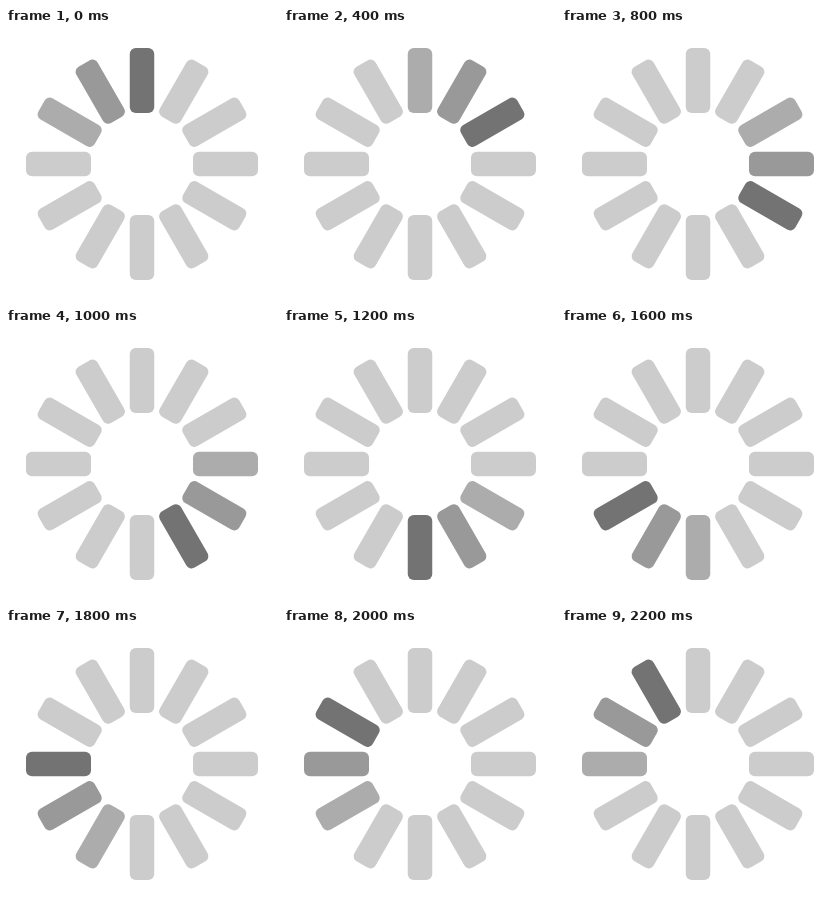
Animation, 272 px wide and 272 px high, one loop 2400 ms. Source, as an HTML page:

```html
<!DOCTYPE html>
<html lang="en">
<head>
<meta charset="utf-8">
<title>Spinner</title>
<style>
  html, body { margin: 0; width: 100%; height: 100%; overflow: hidden; background: #fff; }
  svg { display: block; width: 272px; height: 272px; }
</style>
</head>
<body>
<svg viewBox="0 0 272 272"></svg>
<script>
  const COUNT = 12, STEP = 200;
  const TRAIL = ['#737373', '#999', '#acacac'];
  const REST = '#ccc';
  const svg = document.querySelector('svg');

  const bars = Array.from({ length: COUNT }, (_, i) => {
    const bar = document.createElementNS('http://www.w3.org/2000/svg', 'rect');
    const attrs = {
      x: 123.75, y: 20, width: 24.5, height: 65, rx: 6,
      transform: `rotate(${i * 360 / COUNT} 136 136)`
    };
    for (const key in attrs) bar.setAttribute(key, attrs[key]);
    return svg.appendChild(bar);
  });

  function draw(time) {
    const head = Math.floor(time / STEP) % COUNT;
    bars.forEach((bar, i) => {
      const lag = (head - i + COUNT) % COUNT;
      bar.setAttribute('fill', TRAIL[lag] || REST);
    });
  }

  const start = performance.now();
  function tick() {
    draw(performance.now() - start);
    requestAnimationFrame(tick);
  }
  tick();
</script>
</body>
</html>
```
